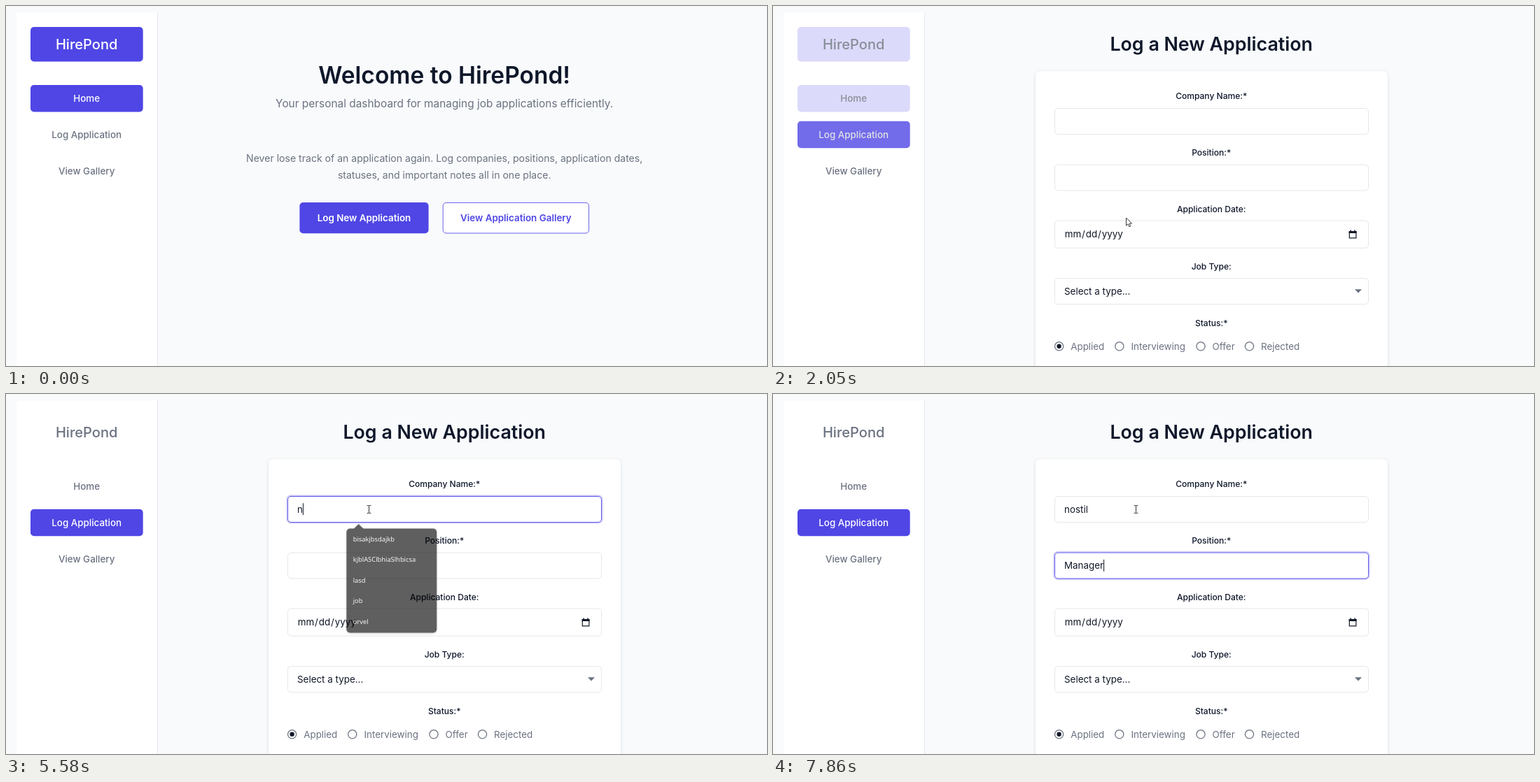
Animation of 1087 by 515 pixels, one loop 8000 ms. Source, as an HTML page:

```html
<!DOCTYPE html>
<html lang="en">
<head>
<meta charset="utf-8">
<title>Job application log</title>
<style>
  html, body { margin: 0; width: 100%; height: 100%; overflow: hidden; background: #f8fafc; }
  svg { display: block; width: 1087px; height: 515px; }
  text { font: 400 13.4px Inter, sans-serif; font-optical-sizing: none; fill: #6b7280; }
  .mid { text-anchor: middle; }
  .nav { font-weight: 500; }
  .brand { font-size: 20.1px; font-weight: 500; }
  .title { font-weight: 600; fill: #0f172a; }
  .lead { font-size: 15.41px; }
  .copy { font-size: 14.07px; }
  .button { font-weight: 600; }
  .label { font-size: 12.06px; font-weight: 500; fill: #0f172a; }
  .value { fill: #111827; }
  .field { fill: #fff; stroke: #e5e7eb; }
  .radio { fill: #fff; stroke: #6b7280; stroke-width: 1.3; }
  .tip text { font: 400 9.6px "Open Sans", sans-serif; fill: #fff; }
  .card { filter: drop-shadow(0 1px 2px rgba(0, 0, 0, .12)); }
  .tip { transform-origin: 550.7px 267px; filter: drop-shadow(0 1px 1.5px rgba(0, 0, 0, .35)); }
</style>
</head>
<body>
<svg viewBox="0 0 1087 515">
  <rect width="1087" height="515" fill="#f8fafc"/>
  <rect x="15" y="9.5" width="201" height="520" fill="#fff"/>
  <rect x="216" y="9.5" width="1" height="520" fill="#e5e7eb"/>
  <rect id="brandBox" x="35" y="30" width="160.7" height="49.5" rx="5"/>
  <rect id="homeBox" x="35" y="113" width="160.7" height="38.4" rx="5"/>
  <rect id="logBox" x="35" y="164.8" width="160.7" height="38.4" rx="5"/>
  <text id="brandText" class="mid brand" x="115.2" y="62.2">HirePond</text>
  <text id="homeText" class="mid nav" x="115.2" y="137.1">Home</text>
  <text id="logText" class="mid nav" x="115.2" y="188.9">Log Application</text>
  <text class="mid nav" x="115.2" y="240.8">View Gallery</text>

  <g id="home">
    <text class="mid title" style="font-size:33.5px" x="626.2" y="111.2">Welcome to HirePond!</text>
    <text class="mid lead" x="626.2" y="145.4">Your personal dashboard for managing job applications efficiently.</text>
    <text class="mid copy" x="626.2" y="223.2">Never lose track of an application again. Log companies, positions, application dates,</text>
    <text class="mid copy" x="626.2" y="247.1">statuses, and important notes all in one place.</text>
    <g id="logButton">
      <rect id="logFace" x="419.4" y="281" width="184.2" height="44.3" rx="5"/>
      <text class="mid button" style="fill:#fff" x="511.5" y="307.9">Log New Application</text>
    </g>
    <rect x="624.2" y="281.4" width="208.4" height="43.6" rx="4.6" fill="#fff" stroke="#4f46e5" stroke-width=".85"/>
    <text class="mid button" style="fill:#4f46e5" x="728.4" y="307.9">View Application Gallery</text>
  </g>

  <g id="form">
    <text class="mid title" style="font-size:26.8px" x="626.2" y="63.8">Log a New Application</text>
    <rect class="card" x="375" y="93.3" width="503" height="500" rx="6" fill="#fff"/>
    <g id="labels"></g>
    <rect id="companyRing" x="401" y="145.2" width="451" height="39.4" rx="6" fill="none" stroke="#4f46e5" stroke-width="1.7"/>
    <rect id="company" class="field" x="402.5" y="146.5" width="448" height="37" rx="4.5"/>
    <rect id="positionRing" x="401" y="225.7" width="451" height="39.4" rx="6" fill="none" stroke="#4f46e5" stroke-width="1.7"/>
    <rect id="position" class="field" x="402.5" y="227" width="448" height="37" rx="4.5"/>
    <rect class="field" x="402.5" y="307" width="448" height="39.2" rx="4.5"/>
    <rect class="field" x="402.5" y="389.7" width="448" height="37" rx="4.5"/>
    <text id="companyText" class="value" x="416" y="169.8"></text>
    <text id="positionText" class="value" x="416" y="250.3"></text>
    <rect id="caret" width="1" height="17" fill="#111827"/>
    <text class="value" x="416.8" y="331.2">mm<tspan dx=".84">/</tspan><tspan dx=".84">dd</tspan><tspan dx=".84">/</tspan><tspan dx=".84">yyyy</tspan></text>
    <path d="M823.3 322.5h9.6v9.4h-9.6z" fill="none" stroke="#111827" stroke-width="1.2"/>
    <path d="M822.7 322h10.8v3h-10.8zM824.4 320.5h1.5v2h-1.5zM830.3 320.5h1.5v2h-1.5z" fill="#111827"/>
    <text class="value" x="416" y="413.1">Select a type...</text>
    <path d="M831 405.2h10l-5 5.4z" fill="#6b7280"/>
    <g id="radios"></g>
  </g>

  <g id="tip" class="tip">
    <path d="M495.5 191.5l7.2-7.3 7.2 7.3z"/>
    <rect x="485" y="191" width="131.6" height="152" rx="5"/>
  </g>

  <g id="pointer">
    <circle id="press" r="10.2" fill="#ff0" opacity=".58"/>
    <path id="arrow" d="M0 0v11.2l2.6-2.4 1.8 4 1.9-.9-1.8-3.8h3.5z" fill="#fff" stroke="#222" stroke-width=".9"/>
    <path id="hand" d="M-1.3 1q1.3-1.8 2.6 0v5l4 .9q1.6.5 1.5 2.2l-.7 3.6-1.2 2.8h-5.6l-4-5.2q-.8-1.7 1-1.6l2.4 1.6z" fill="#fff" stroke="#222" stroke-width=".7"/>
    <path id="beam" d="M-2.8-5.5h2q.8 0 .8.8 0-.8.8-.8h2M0-5V5M-2.8 5.5h2q.8 0 .8-.8 0 .8.8.8h2" fill="none" stroke="#333" stroke-width="1"/>
  </g>
</svg>
<script>
const LOOP = 8000, PAGE = 1978, FOCUS = 3000, TAB = 6638;
const $ = id => document.getElementById(id);
const add = (parent, markup) => $(parent).insertAdjacentHTML('beforeend', markup);

[['Company Name:*', 133.3], ['Position:*', 213.9], ['Application Date:', 294.6],
 ['Job Type:', 376.6], ['Status:*', 457.5]].forEach(([label, y]) =>
  add('labels', `<text class="mid label" x="626.2" y="${y}">${label}</text>`));

[['Applied', 408.6], ['Interviewing', 494.8], ['Offer', 611], ['Rejected', 680.5]].forEach(([label, x], i) =>
  add('radios', `<circle class="radio" cx="${x}" cy="486.8" r="6.1"/>
    ${i ? '' : `<circle cx="${x}" cy="486.8" r="3.2" fill="#111827"/>`}
    <text x="${x + 16.6}" y="491.7">${label}</text>`));

['bisakjbsdajkb', 'kjblASClbhiaSlhbicsa', 'lasd', 'job', 'orvel'].forEach((item, i) =>
  add('tip', `<text x="494.6" y="${209.6 + i * 30.2}">${item}</text>`));

// time, x, y
const path = [
  [180, 908, 456], [330, 770, 403], [490, 560, 363], [650, 478, 342], [790, 470, 346],
  [880, 400, 340], [980, 300, 300], [1070, 228, 245], [1160, 180, 190], [1230, 155, 156],
  [1320, 215, 192], [1420, 370, 262], [1510, 470, 296], [1640, 497, 301], [1840, 504.5, 303],
  [2400, 504.5, 303], [2560, 509, 278], [2720, 514, 225], [2900, 515, 166], [2990, 515.3, 159.6],
  [3065, 515.3, 159.6], [3200, 518.5, 165]
];
const companyKeys = ['nostil', [5520, 5710, 5840, 5980, 6120, 6310]];
const positionKeys = ['Manager', [7120, 7260, 7360, 7450, 7590, 7730, 7860]];

const clamp = x => Math.min(1, Math.max(0, x));
const ease = x => 1 - (1 - clamp(x)) ** 2.3;
const between = (t, a, b) => t >= a && t < b;
const mix = (a, b, p) => `color-mix(in srgb, ${a}, ${b} ${p * 100}%)`;
const typed = ([word, times], t) => word.slice(0, times.filter(k => k <= t).length);
const show = (id, on) => $(id).style.display = on ? '' : 'none';
const fill = (id, color) => $(id).style.fill = color;

function pointerAt(t) {
  const i = path.findIndex(p => p[0] > t);
  if (i < 0) return path.at(-1).slice(1);
  if (!i) return path[0].slice(1);
  const [t0, x0, y0] = path[i - 1], [t1, x1, y1] = path[i];
  const p = (t - t0) / (t1 - t0);
  return [x0 + (x1 - x0) * p, y0 + (y1 - y0) * p];
}

function drawSidebar(t, hover) {
  const p = t < PAGE ? 0 : ease((t - 1950) / 200);
  for (const id of ['brand', 'home']) {
    fill(id + 'Box', mix('#4f46e5', '#ffffff', p));
    fill(id + 'Text', mix('#ffffff', '#6b7280', p));
  }
  fill('logBox', mix(hover ? '#f9fafb' : '#ffffff', '#4f46e5', p));
  fill('logText', mix(hover ? '#4f46e5' : '#6b7280', '#ffffff', p));
}

function drawFocus(id, p) {
  $(id).style.stroke = mix('#e5e7eb', '#5b53e7', p);
  $(id + 'Ring').style.opacity = .25 * p;
}

function drawForm(t) {
  const moved = t < TAB ? 0 : ease((t - 6580) / 200);
  drawFocus('company', ease((t - FOCUS) / 200) * (1 - moved));
  drawFocus('position', moved);
  $('companyText').textContent = typed(companyKeys, t);
  $('positionText').textContent = typed(positionKeys, t);

  const active = t < TAB ? 'companyText' : 'positionText';
  const blinkOff = between(t, 3530, 4070) || between(t, 4590, 5120);
  show('caret', t >= FOCUS && !blinkOff);
  $('caret').setAttribute('x', 416 + $(active).getComputedTextLength());
  $('caret').setAttribute('y', t < TAB ? 156.2 : 236.8);

  const tip = clamp((t - FOCUS) / 55) * (1 - clamp((t - 5520) / 162));
  show('tip', tip > 0);
  $('tip').style.opacity = tip;
  $('tip').style.transform = `scale(${.945 + .055 * tip})`;
}

function drawPointer(t, x, y, overLink) {
  const overInput = t >= PAGE && (between(y, 146, 184) || between(y, 226, 265));
  show('pointer', t >= 180);
  show('hand', overLink);
  show('beam', overInput);
  show('arrow', !overLink && !overInput);
  show('press', between(t, 1845, PAGE) || between(t, 2990, 3128));
  $('pointer').setAttribute('transform', `translate(${x} ${y})`);
}

function draw(t) {
  const [x, y] = pointerAt(t);
  const onHome = t < PAGE;
  const overNav = onHome && between(x, 35, 196) && between(y, 113, 203);
  const overButton = onHome && between(x, 419, 604) && between(y, 280, 325);
  const lift = ease((t - 1450) / 200);

  show('home', onHome);
  show('form', !onHome);
  drawSidebar(t, overNav && y > 165);
  fill('logFace', mix('#4f46e5', '#4338ca', lift));
  $('logButton').setAttribute('transform', `translate(0 ${-1.7 * lift})`);
  drawForm(t);
  drawPointer(t, x, y, overNav || overButton);
}

const start = performance.now();
function tick() {
  draw((performance.now() - start) % LOOP);
  requestAnimationFrame(tick);
}
tick();
</script>
</body>
</html>
```
